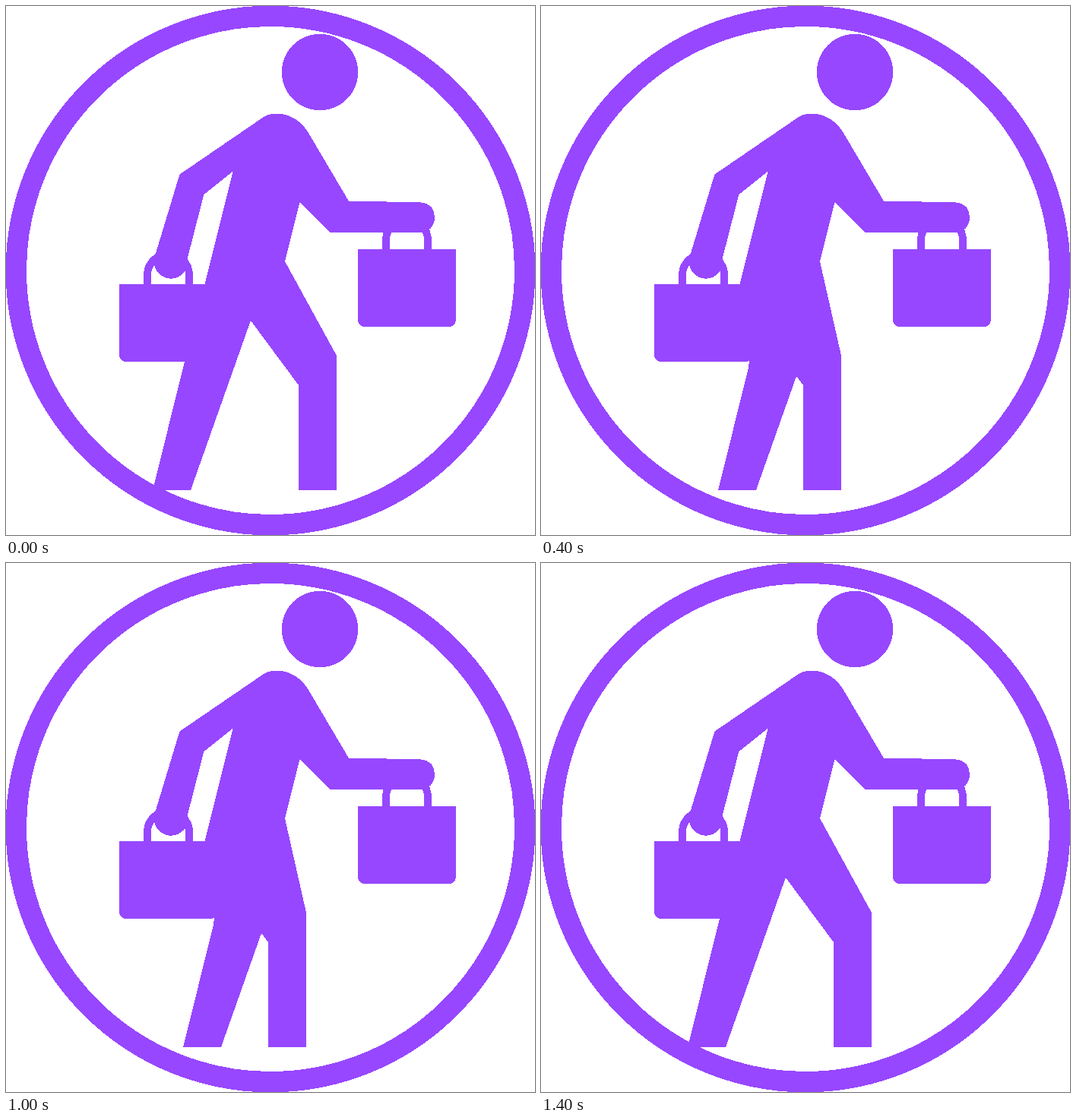
These frames come from a looping animation (696 px wide and 696 px high, 1500 ms). An HTML page:

```html
<!DOCTYPE html>
<html lang="en">
<head>
<meta charset="utf-8">
<title>Walking shopper</title>
<style>
  html, body { margin: 0; width: 100%; height: 100%; overflow: hidden; background: #fff; }
  svg { display: block; width: 100%; height: 100%; fill: #9747ff; shape-rendering: crispEdges; }
  .line { fill: none; stroke: #9747ff; }
</style>
</head>
<body>
<svg viewBox="0 0 696 696">
  <defs>
    <g id="bag">
      <path d="M0 0H129V93A9 9 0 0 1 120 102H9A9 9 0 0 1 0 93Z"/>
      <path class="line" stroke-width="10" d="M37 1V-12A27.5 27.5 0 0 1 92 -12V1"/>
    </g>
  </defs>
  <circle class="line" cx="348" cy="348" r="334.7" stroke-width="27.4"/>
  <circle cx="413" cy="87" r="50.2"/>
  <path d="M228.400 221.600L340 145.300Q348 141.500 356 141.500C373 141.500 388 151 397.400 166L451 256.700
           L545 258.200C558 259 564 267 564 278C564 289 557 298 545 298H426L386.500 258.500L367 336V366H261.600
           L298.600 217.500L260.400 248L239 331A22.500 22.500 0 1 1 195 332Z"/>
  <use href="#bag" x="149" y="366"/>
  <use href="#bag" x="463" y="320"/>
  <path id="legs"/>
</svg>
<script>
const STEP = 100, STEPS = 15;
const GROUND = 637, KNEE = 460, BEND = 499, HEM = 467;
const WIDTH = 50, STRIDE = 10;
const THIGH = 0.741, SHIN = 0.354, CALF = 0.2485; // horizontal run per unit of height

// The feet slide towards each other; n counts the steps from the widest pose.
function legsPath(n) {
  const front = 435 - STRIDE * n, heel = 193 + STRIDE * n;
  const inner = front - WIDTH, toe = heel + WIDTH, gap = inner - toe;

  // The crotch is where the back leg meets the front thigh, or the front shin below it.
  const atThigh = (BEND * THIGH + GROUND * SHIN - gap) / (THIGH + SHIN);
  const atShin = GROUND - gap / SHIN;
  const crotch = Math.min(GROUND, Math.max(atThigh, atShin));

  const hip = [Math.min(367 + 7 * n, front), 336 + 31 * Math.min(n, 4)];
  const calf = Math.min(GROUND, Math.max(HEM, 266 + 53 * n));

  return "M" + [
    [261.6, 366], [367, 336], hip, [front, KNEE], [front, GROUND],
    [inner, GROUND], [inner, Math.max(BEND, crotch)],
    [toe + (GROUND - crotch) * SHIN, crotch],
    [toe, GROUND], [heel, GROUND],
    [heel + (GROUND - calf) * CALF, calf],
    [Math.min(274, heel + (GROUND - HEM) * CALF), HEM]
  ].join(" ") + "Z";
}

const legs = document.getElementById("legs");

function draw() {
  const step = Math.floor(performance.now() / STEP) % STEPS;
  legs.setAttribute("d", legsPath(Math.min(step, STEPS - 1 - step)));
  requestAnimationFrame(draw);
}
draw();
</script>
</body>
</html>
```
